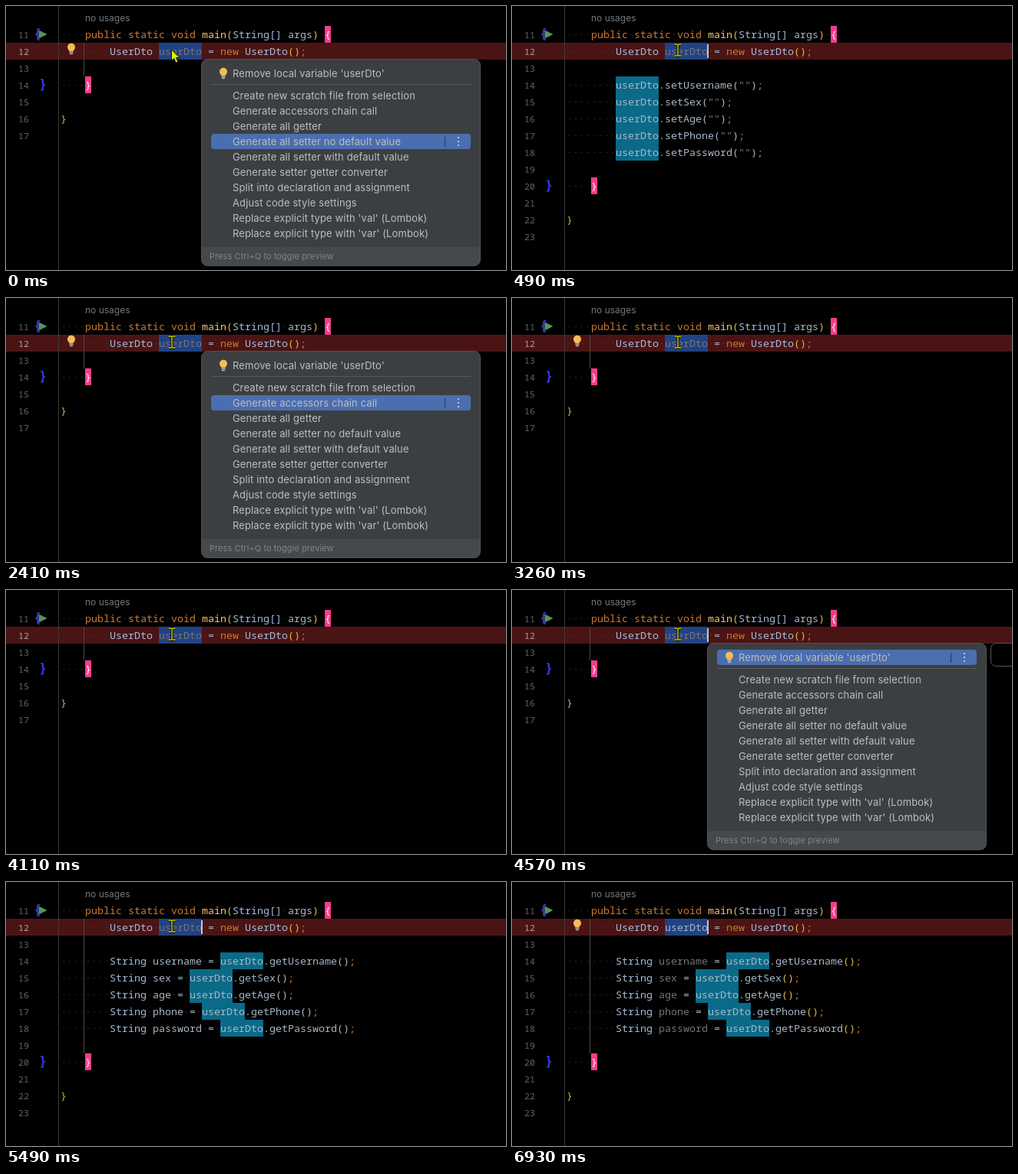
An HTML page that plays this animation: 651x345 px, repeating every 6990 ms.

```html
<!DOCTYPE html>
<html lang="en">
<head>
<meta charset="utf-8">
<title>Generate accessors from a menu</title>
<style>
  html, body { margin: 0; width: 100%; height: 100%; overflow: hidden; background: #000; }
  svg { display: block; width: 651px; height: 345px; }
  text { white-space: pre; }
  .code { font: 13.33px "Noto Sans Mono", "DejaVu Sans Mono", monospace; }
  .num { font: 11.67px "Noto Sans Mono", "DejaVu Sans Mono", monospace; }
  .brace { font: bold 17px "Noto Sans Mono", "DejaVu Sans Mono", monospace; fill: #3838e8; }
  .item { font: 13px Inter, "Open Sans", sans-serif; letter-spacing: .12px; fill: #bcbec0; }
  .hint { font: 12px Inter, "Open Sans", sans-serif; fill: #767676; }
  .foot { font: 11px Inter, "Open Sans", sans-serif; letter-spacing: .07px; fill: #818486; }
</style>
</head>
<body>
<svg id="stage" viewBox="0 0 651 345" xmlns="http://www.w3.org/2000/svg"></svg>
<script>
const LOOP = 6990, LEFT = 71, CELL = 8, ROW = 22;
const INK = '#a9b7c6', TYPE = '#a3bbdc', KEY = '#cc7832', FUNC = '#ffc66d',
      PAREN = '#e8ba36', STR = '#6a8759', DIM = '#72757d', DOT = '#4d4b4b',
      TEAL = '#0a6a88', PINK = '#f53d8c';

const FIELDS = ['username', 'sex', 'age', 'phone', 'password'];
const ITEMS = [
  "Remove local variable 'userDto'",
  'Create new scratch file from selection',
  'Generate accessors chain call',
  'Generate all getter',
  'Generate all setter no default value',
  'Generate all setter with default value',
  'Generate setter getter converter',
  'Split into declaration and assignment',
  'Adjust code style settings',
  "Replace explicit type with 'val' (Lombok)",
  "Replace explicit type with 'var' (Lombok)"
];

// [start time, menu row]
const PICKS = [[0, 4], [60, 5], [1710, 0], [2170, 1], [2410, 2], [2560, 3], [2800, 4],
               [4570, 0], [4840, 1], [5030, 2], [5220, 3]];

const within = (t, ...spans) => spans.some(([a, b]) => t >= a && t < b);
const rowTop = n => 26 + (n - 11) * ROW;
const itemY = i => i ? 97.5 + 20 * i : 88;

const rect = (x, y, w, h, fill, more = '') =>
  `<rect x="${x}" y="${y}" width="${w}" height="${h}" fill="${fill}" ${more}/>`;
const path = (d, more) => `<path d="${d}" ${more}/>`;
const text = (cls, x, y, s, fill) =>
  `<text class="${cls}" x="${x}" y="${y}"${fill ? ` fill="${fill}"` : ''}>${s}</text>`;

// Draws tokens [text, colour, background] in a cell grid; spaces become dots.
function line(n, tokens) {
  const y = rowTop(n);
  let col = 0, out = '';
  for (const [s, fill, back] of tokens) {
    if (back) out += rect(LEFT + col * CELL, y, s.length * CELL, ROW, back);
    for (const part of s.match(/ |[^ ]+/g)) {
      const x = LEFT + col * CELL;
      out += part === ' ' ? rect(x + 3.5, y + 11, 1, 1, DOT) : text('code', x, y + 16, part, fill);
      col += part.length;
    }
  }
  return out;
}

function stateAt(t) {
  const kind = within(t, [490, 1110]) ? 'full' : within(t, [3320, 3810]) ? 'bare' : t >= 5490 ? 'get' : '';
  return {
    kind,
    menu: within(t, [0, 430], [1710, 3260], [4570, 5490]),
    pick: PICKS.filter(p => p[0] <= t).pop()[1],
    bulb: within(t, [0, 490], [1770, 3320], [4640, 5490], [6290, LOOP]),
    caret: within(t, [490, 1110], [1650, 1770], [3320, 3810], [4570, 4700], [5490, 6430], [6930, LOOP]),
    used: within(t, [830, 1470], [3630, 4110], [5830, LOOP]),
    colored: within(t, [770, 1110], [3570, 3810], [5700, LOOP]),
    guide: !within(t, [490, 770], [1110, 1410], [3320, 3570], [3810, 4110]),
    preview: within(t, [1710, 1770], [2170, 2410], [4570, 4700], [4840, 5030]) ? 31
      : within(t, [1770, 2170]) ? 93 : within(t, [4700, 4840]) ? 84 : 0,
    move: t < 6290 ? 0 : Math.floor((t - 6290) / 62.8),
    arrow: t < 430
  };
}

function fieldLine(n, name, s) {
  const paren = s.colored ? PAREN : INK;
  const cap = name[0].toUpperCase() + name.slice(1);
  const self = ['userDto', INK, TEAL];
  if (s.kind === 'get') return line(n, [
    ['        ', DOT], ['String ', TYPE], [name, s.used ? DIM : INK], [' = ', INK],
    self, ['.get' + cap, INK], ['()', paren], [';', KEY]]);
  return line(n, [
    ['        ', DOT], self, ['.set' + cap, INK], ['(', paren],
    ...(s.kind === 'full' ? [['""', STR]] : []), [')', paren], [';', KEY]]);
}

function editor(s) {
  const end = s.kind ? 20 : 14;
  let out = rect(0, 0, 651, 345, '#000') + rect(0, 48, 651, ROW, '#4b1414');
  out += rect(68, 0, 1, 345, '#3b3b3b');
  for (let n = 11; n <= end + 3; n++)
    out += text('num', 16, rowTop(n) + 16, n, n === 12 ? '#a8a3a3' : '#606366');
  if (s.guide) out += rect(101, 48, 1, rowTop(end) - 48, '#484848');
  out += text('hint', 103, 20, 'no usages');
  out += path('M42.5 31.5L53.5 37L42.5 42.5Z', 'fill="#58945c"');
  out += text('brace', 36, 42, '{') + text('brace', 43, rowTop(end) + 15.5, '}');
  out += line(11, [['    ', DOT], ['public static void ', KEY], ['main', FUNC], ['(', PAREN],
    ['String[] ', TYPE], ['args', INK], [')', PAREN], [' ', DOT], ['{', '#fff', PINK]]);
  out += line(12, [['        ', DOT], ['UserDto ', TYPE], ['userDto', s.used ? INK : DIM, '#214283'],
    [' = ', INK], ['new ', KEY], ['UserDto', TYPE], ['()', PAREN], [';', KEY]]);
  if (s.kind) FIELDS.forEach((f, i) => out += fieldLine(14 + i, f, s));
  out += line(end, [['    ', DOT], ['}', '#fff', PINK]]);
  out += line(end + 2, [['}', '#d0bd36']]);
  if (s.caret) out += rect(254, 50, 2, 18, '#c4c4c4');
  if (s.bulb) out += bulb(85, 56);
  return out;
}

function bulb(x, y) {
  return `<g transform="translate(${x} ${y})">` +
    path('M-2.5 3.5C-2.5 1.8-5 1-5-2.2A5 5 0 0 1 5-2.2C5 1 2.5 1.8 2.5 3.5Z', 'fill="#f4bd55"') +
    rect(-2.5, 4, 5, 1.2, '#c8c8c8') + rect(-2, 6, 4, 1.2, '#c8c8c8') + '</g>';
}

function menu(s) {
  let out = '';
  if (s.preview)
    out += rect(623.5, 69.5, 60, s.preview - 1, '#000', 'rx="7" stroke="#555759"');
  out += rect(254.5, 69.5, 363, 270, '#3c3f41', 'rx="8"');
  out += path('M255 315H617V332A7.5 7.5 0 0 1 609.5 339.5H262.5A7.5 7.5 0 0 1 255 332Z', 'fill="#46494b"');
  out += rect(267, 102, 338, 1, '#585b5d');
  out += rect(254.5, 69.5, 363, 270, 'none', 'rx="8" stroke="#4f5254"');
  const y = s.pick ? itemY(s.pick) - .5 : 88;
  out += rect(267, y - 10, 338, 20, '#4b6eaf', 'rx="4"') + rect(571, y - 6, 1, 13, '#22355e');
  for (const d of [-5, 0, 5]) out += rect(588, y + d - 1, 2, 2, '#c0c6d0');
  ITEMS.forEach((label, i) => out += text('item', 295, itemY(i) + 4.7, label));
  return out + bulb(283, 88) + text('foot', 265, 331, 'Press Ctrl+Q to toggle preview');
}

function pointer(s) {
  if (s.move > 6) return '';
  if (s.arrow)
    return path('M215.5 57V71.5L218.8 68.6L221.2 74L223.8 72.8L221.5 67.6H226Z',
      'fill="#e4f000" stroke="#161600" stroke-width="1"');
  const e = (s.move / 6) ** 1.5;
  const d = 'M-4.5-7.5H-1.5L0-6.5L1.5-7.5H4.5M0-6.5V6.5M-4.5 7.5H-1.5L0 6.5L1.5 7.5H4.5';
  return `<g transform="translate(${216 + 394 * e} ${57.5 + 281 * e})" fill="none">` +
    path(d, 'stroke="#111" stroke-width="3.6"') + path(d, 'stroke="#ccd000" stroke-width="1.4"') + '</g>';
}

const stage = document.getElementById('stage');
const start = performance.now();
let shown = '';

function frame() {
  const s = stateAt((performance.now() - start) % LOOP);
  const key = JSON.stringify(s);
  if (key !== shown) {
    shown = key;
    stage.innerHTML = editor(s) + (s.menu ? menu(s) : '') + pointer(s);
  }
  requestAnimationFrame(frame);
}
frame();
</script>
</body>
</html>
```
